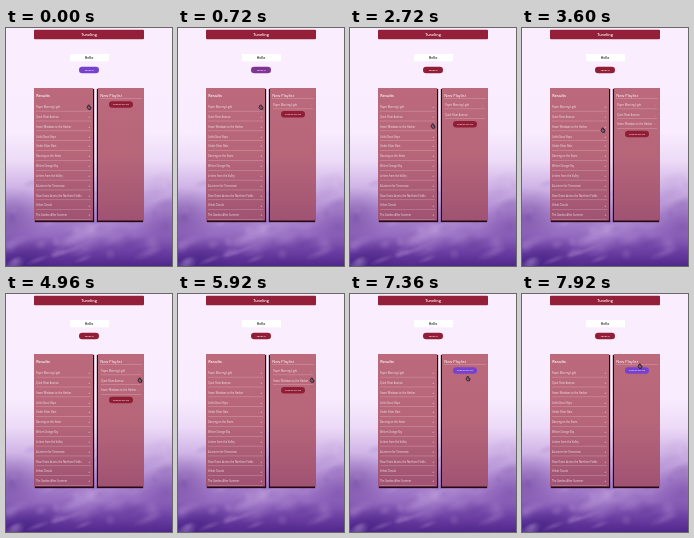
Recreate the animation shown at these times as an HTML page with a canvas. Size 166 px wide and 238 px high, loop 8 s.

```html
<!DOCTYPE html>
<html lang="en">
<head>
<meta charset="utf-8">
<title>Playlist builder</title>
<style>
html, body { margin: 0; width: 100%; height: 100%; overflow: hidden; }
canvas { display: block; width: 100vw; height: 100vh; }
</style>
</head>
<body>
<canvas id="stage"></canvas>
<script>
const W = 166, H = 238, LOOP = 8000, ROW = 9.85;
const RED = [145, 29, 54], PURPLE = [118, 66, 205];
const FONT = '"Open Sans", Inter, sans-serif';
const canvas = document.getElementById('stage');
const ratio = window.devicePixelRatio || 1;
canvas.width = W * ratio;
canvas.height = H * ratio;
const ctx = canvas.getContext('2d');
ctx.scale(ratio, ratio);

const songs = [
  'Paper Morning Light', 'Quiet River Avenue', 'Seven Windows to the Harbor',
  'Little Glass Ships', 'Under Silver Rain', 'Dancing on the Stairs',
  'Winter Orange Sky', 'Letters from the Valley', 'A Lantern for Tomorrow',
  'Slow Trains Across the Northern Fields', 'Velvet Clouds', 'The Garden After Summer'
];

// [time, x, y]
const pointer = [
  [0, 83, 79], [1300, 83, 79], [1650, 83, 88], [2300, 83, 88],
  [2750, 83, 98], [3250, 83, 98], [3600, 81, 102], [4000, 87, 101],
  [4800, 134, 86], [6200, 134, 86], [6800, 123, 86], [7050, 118, 86],
  [7300, 118, 85], [7800, 118, 73], [7920, 118, 72], [8000, 118, 72]
];
// [time, songs in the playlist]
const edits = [
  [0, []], [560, [0]], [2080, [0, 1]], [3040, [0, 1, 2]],
  [5280, [0, 2]], [6160, [0]], [7280, []]
];

const clamp = v => Math.max(0, Math.min(1, v));
const ease = v => { v = clamp(v); return v * v * (3 - 2 * v); };
const mix = (a, b, p) => `rgb(${a.map((v, i) => Math.round(v + (b[i] - v) * p))})`;

function pointerAt(t) {
  const i = Math.max(1, pointer.findIndex(k => k[0] > t));
  const [t0, x0, y0] = pointer[i - 1], [t1, x1, y1] = pointer[i];
  const p = ease((t - t0) / (t1 - t0));
  return [x0 + (x1 - x0) * p, y0 + (y1 - y0) * p];
}

function gradient(target, y0, y1, colors) {
  const g = target.createLinearGradient(0, y0, 0, y1);
  colors.forEach(([stop, color]) => g.addColorStop(stop, color));
  return g;
}

function box(x, y, w, h, radius, fill) {
  ctx.fillStyle = fill;
  ctx.beginPath();
  ctx.roundRect(x, y, w, h, radius);
  ctx.fill();
}

function text(value, x, y, size, color = '#fff', align = 'left', weight = 400) {
  ctx.font = `${weight} ${size}px ${FONT}`;
  ctx.fillStyle = color;
  ctx.textAlign = align;
  ctx.textBaseline = 'middle';
  ctx.fillText(value, x, y);
}

function makeBackground() {
  const layer = document.createElement('canvas');
  layer.width = canvas.width;
  layer.height = canvas.height;
  const c = layer.getContext('2d');
  c.scale(ratio, ratio);
  c.fillStyle = gradient(c, 0, H, [
    [0, '#faeefe'], [.44, '#f9ecfe'], [.56, '#ecdaf7'], [.66, '#d2b7e8'],
    [.78, '#ac87cf'], [.87, '#946bc0'], [.94, '#6c3fa3'], [1, '#4f268a']
  ]);
  c.fillRect(0, 0, W, H);
  let seed = 19;
  const random = () => (seed = seed * 16807 % 2147483647) / 2147483647;
  function wash(x, y, rx, ry, rgb, alpha) {
    c.save();
    c.translate(x, y);
    c.rotate(-.35);
    c.scale(rx, ry);
    const g = c.createRadialGradient(0, 0, 0, 0, 0, 1);
    g.addColorStop(0, `rgba(${rgb},${alpha})`);
    g.addColorStop(1, `rgba(${rgb},0)`);
    c.fillStyle = g;
    c.fillRect(-1, -1, 2, 2);
    c.restore();
  }
  wash(4, 190, 36, 30, '101,59,149', .5);
  wash(160, 198, 32, 28, '110,66,160', .5);
  wash(15, 232, 45, 18, '62,28,125', .5);
  wash(84, 203, 40, 14, '214,186,236', .4);
  // Cloud texture grows stronger towards the bottom.
  for (let i = 0; i < 80; i++) {
    const depth = random();
    const tone = random() < .4 ? '220,192,240' : '92,50,150';
    wash(random() * W, 150 + depth * 88, 4 + random() * 14,
      3 + random() * 7, tone, .06 + depth * .16);
  }
  return layer;
}

function panel(x, width, title, shadowX, weight) {
  ctx.save();
  ctx.shadowColor = '#260814';
  ctx.shadowBlur = ratio;
  ctx.shadowOffsetX = shadowX * ratio;
  ctx.shadowOffsetY = ratio;
  box(x, 60, width, 132.5, 0, gradient(ctx, 60, 193, [
    [0, '#bb697b'], [.5, '#b7667a'], [.8, '#a95b75'], [1, '#9f5272']
  ]));
  ctx.restore();
  text(title, x + 2.3, 68.3, 3.9, '#fff', 'left', weight);
}

function rule(x, y, right) {
  ctx.fillStyle = 'rgba(255,235,240,.4)';
  ctx.fillRect(x, y, right - x, .5);
}

function track(title, x, y, right, sign) {
  text(title, x, y, 2.55, 'rgba(255,255,255,.85)');
  text(sign, right - 2, y, 3, '#fff', 'center');
  rule(x, y + 3.6, right);
}

function pill(label, x, y, width, height, purpleAmount) {
  box(x, y, width, height, height / 2, mix(RED, PURPLE, purpleAmount));
  text(label, x + width / 2, y + height / 2, 2.3, '#fff', 'center', 600);
}

function hand(x, y) {
  ctx.save();
  ctx.translate(x, y);
  ctx.beginPath();
  ctx.moveTo(-.7, -2);
  ctx.lineTo(.3, -2);
  ctx.lineTo(.4, -.5);
  ctx.lineTo(2, 0);
  ctx.lineTo(1.6, 2.3);
  ctx.lineTo(-.7, 2.3);
  ctx.lineTo(-2, .5);
  ctx.closePath();
  ctx.fillStyle = '#796074';
  ctx.strokeStyle = '#29111f';
  ctx.lineWidth = .8;
  ctx.fill();
  ctx.stroke();
  ctx.restore();
}

const background = makeBackground();

function draw(t) {
  ctx.drawImage(background, 0, 0, W, H);
  box(28, 1.8, 110, 9.4, 1, '#941f39');
  text('Tuneling', 83, 6.6, 3.8, '#fff', 'center', 600);
  box(64, 26, 39, 7.2, .5, '#fff');
  text('Hello', 83, 29.8, 3.4, '#222', 'center', 600);
  pill('SEARCH', 73, 38.7, 20, 6.5, 1 - ease((t - 520) / 480));

  panel(28, 59, 'Results', 1, 600);
  songs.forEach((song, i) => track(song, 30, 79.3 + i * ROW, 85, '+'));

  panel(92, 46, 'New Playlist', -1, 400);
  rule(94, 70.5, 136);
  const chosen = edits.filter(([start]) => t >= start).at(-1)[1];
  chosen.forEach((song, i) => track(songs[song], 95, 77 + i * ROW, 135, '-'));
  pill('SAVE PLAYLIST', 103, 73.2 + chosen.length * ROW, 24, 6.5,
    ease((t - 6850) / 500));
  hand(...pointerAt(t));
}

function frame(now) {
  draw(now % LOOP);
  requestAnimationFrame(frame);
}
draw(0);
requestAnimationFrame(frame);
</script>
</body>
</html>
```
